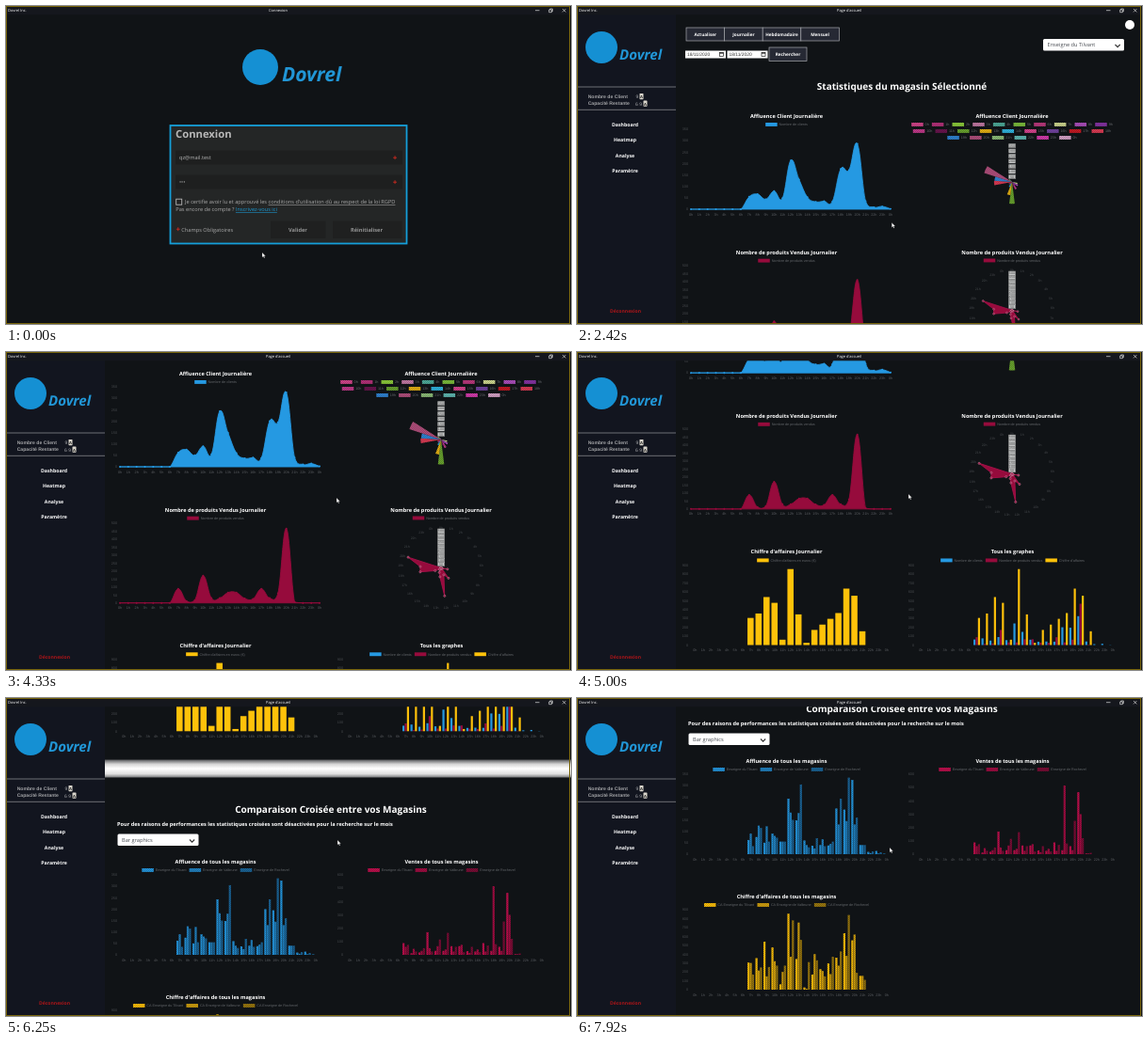
An HTML page that plays this animation: 600x338 px, repeating every 8000 ms.

```html
<!DOCTYPE html>
<html lang="fr">
<head>
<meta charset="utf-8">
<title>Tableau de bord</title>
<style>
html, body { margin: 0; width: 100%; height: 100%; overflow: hidden; background: #101316; }
svg { display: block; width: 100vw; height: 100vh; }
text { font-family: "Open Sans", sans-serif; text-rendering: geometricPrecision; white-space: pre; }
.axis { font-family: "Liberation Sans", Arial, sans-serif; }
.b { font-weight: 700; }
.m { text-anchor: middle; }
.e { text-anchor: end; }
</style>
</head>
<body>
<svg id="stage" viewBox="0 0 600 338" preserveAspectRatio="none"></svg>
<script>
const LOOP = 8000, BRAND = 'Dovrel';
const BLUE = '#2599e2', CRIMSON = '#960b3c', YELLOW = '#ffc20a';
const SHOPS = ['Enseigne du Tilvant', 'Enseigne de Valbrune', 'Enseigne de Rochevel'];

// Hourly values, opening at 7h, padded to 25 labels (0h ... 23h, 0h)
const day = (...v) => [...Array(7).fill(0), ...v, ...Array(18 - v.length).fill(0)];
const clients = [
  day(62, 75, 50, 90, 55, 243, 148, 60, 37, 40, 38, 200, 195, 325, 40, 10, 14, 2),
  day(90, 125, 122, 80, 55, 182, 180, 40, 25, 65, 45, 130, 145, 130, 40, 5, 3),
  day(35, 115, 55, 72, 55, 150, 305, 30, 70, 35, 55, 243, 335, 160, 40, 12, 8)];
const sold = [
  day(88, 12, 18, 170, 30, 30, 65, 65, 28, 25, 88, 30, 60, 465, 5),
  day(60, 45, 30, 50, 65, 40, 25, 75, 15, 40, 25, 515, 30, 300, 5),
  day(75, 25, 50, 25, 115, 165, 60, 20, 60, 20, 70, 80, 250, 120, 10)];
const sales = [
  day(305, 355, 540, 475, 60, 855, 345, 25, 170, 230, 295, 360, 635, 555, 155),
  day(300, 215, 150, 320, 200, 370, 755, 10, 400, 210, 175, 270, 380, 620, 155),
  day(170, 250, 255, 270, 270, 780, 560, 310, 330, 150, 370, 430, 840, 190, 110)];
const radarPeaks = { 11: 100, 12: 380, 13: 120, 18: 285, 19: 280 };
const radarValues = sold[0].map((v, h) => radarPeaks[h] ?? v);

const rect = (x, y, w, h, fill, extra = '') =>
  `<rect x="${x}" y="${y}" width="${w}" height="${h}" fill="${fill}" ${extra}/>`;
const text = (x, y, s, size, fill = '#fff', cls = '', extra = '') =>
  `<text x="${x}" y="${y}" font-size="${size}" fill="${fill}" class="${cls}" ${extra}>${s}</text>`;
const path = (d, fill, extra = '') => `<path d="${d}" fill="${fill}" ${extra}/>`;
const circle = (x, y, r, fill, extra = '') => `<circle cx="${x}" cy="${y}" r="${r}" fill="${fill}" ${extra}/>`;
const line = (d, color, width = 1) => path(d, 'none', `stroke="${color}" stroke-width="${width}"`);
const hour = i => `${i % 24}h`;

const ruler = document.createElement('canvas').getContext('2d');
ruler.font = '37.5px "Liberation Sans", Arial, sans-serif';
const labelWidth = s => ruler.measureText(s).width / 10;

// items: [label, colour, patterned]
function legend(cx, y, items) {
  const pitch = items.map(([s]) => 17.5 + labelWidth(s));
  let x = cx - (pitch.reduce((a, b) => a + b) - 3.1) / 2;
  return items.map(([s, color, dotted], i) => {
    const box = fill => rect(x, y - 2, 12.5, 3.9, fill);
    const out = box(color) + (dotted ? box('url(#dots)') : '') + text(x + 14.4, y + 1.3, s, 3.75, '#63666a', 'axis');
    x += pitch[i];
    return out;
  }).join('');
}

const grow = (x, y, body, axes = 'y') => `<g class="grow" data-x="${x}" data-y="${y}" data-axes="${axes}">${body}</g>`;

// Left edge x and vertical offset y place a 212 x 85 plot
const plotBase = 216, plotWidth = 212;
function frame(x, y, title, max, step, offset) {
  let out = text(x + 101.5, y + 119, title, 5.6, '#fff', 'b m');
  for (let v = 0; v <= max; v += step)
    out += text(x - 3, y + plotBase + 1.3 - v / max * 85, v, 3.75, '#484b4f', 'axis e');
  const gap = offset ? plotWidth / 25 : plotWidth / 24;
  for (let i = 0; i < 25; i++)
    out += text(x + gap * (i + (offset ? .5 : 0)), y + 222.5, hour(i), 3.75, '#5a5d61', 'axis m');
  return out;
}

function areaChart(x, y, title, label, color, values, max, step) {
  const floor = y + plotBase;
  const pts = values.map((v, i) => [x + i * plotWidth / 24, floor - v / max * 85]);
  let d = `M${pts[0]}`;
  for (let i = 1; i < 25; i++) {
    const [p, a, b, n] = [pts[Math.max(i - 2, 0)], pts[i - 1], pts[i], pts[Math.min(i + 1, 24)]];
    const handle = (q, s, t, k) => [q[0] + (t[0] - s[0]) * k, Math.min(floor, q[1] + (t[1] - s[1]) * k)];
    d += `C${handle(a, p, b, .2)} ${handle(b, a, n, -.2)} ${b}`;
  }
  const dots = pts.map(([px, py]) => circle(px, py, 1, color)).join('');
  return frame(x, y, title, max, step) + legend(x + 101.5, y + 126, [[label, color]]) +
    grow(0, floor, path(`${d}V${floor}H${x}Z`, color, `stroke="${color}" stroke-width=".9"`) + dots);
}

// series: [label, colour, values, patterned]
function barChart(x, y, title, series, max, step) {
  const slot = plotWidth / 25, width = slot * .84 / series.length;
  let bars = '';
  series.forEach(([, color, values, dotted], k) => values.forEach((v, i) => {
    if (!v) return;
    const h = v / max * 85;
    const bar = fill => rect(x + slot * (i + .08) + k * width, y + plotBase - h, width * .92, h, fill);
    bars += bar(color) + (dotted ? bar('url(#dots)') : '');
  }));
  return frame(x, y, title, max, step, true) +
    legend(x + 101.5, y + 126, series.map(([s, c, , dotted]) => [s, c, dotted])) +
    grow(0, y + plotBase, bars);
}

const polar = (cx, cy, r, index) => {
  const a = index / 25 * 2 * Math.PI;
  return [cx + r * Math.sin(a), cy - r * Math.cos(a)];
};
function radialTicks(cx, cy, radius, max) {
  let out = '';
  for (let v = 50; v <= max; v += 50) {
    const y = cy - v / max * radius;
    out += rect(cx - 3.8, y - 2.3, 7.6, 4.5, '#c3c5c5', 'stroke="#222" stroke-width=".25"') + text(cx, y + 1.3, v, 3.75, '#555', 'axis m');
  }
  return out;
}

const accents = ['#d6468d', '#b8327c', '#8fd03c', '#c77ca8', '#4fae9c', '#7fc13d', '#c03a80', '#d3dc92', '#b050c0', '#8a35a8',
  '#c43a8c', '#6b1550', '#6aa52f', '#eab414', '#31b9e4', '#db4591', '#7444a4', '#c81a24', '#df3c55',
  '#3187d8', '#b5517f', '#8fc07a', '#62bdb6', '#d93db0', '#dba6cc'];

function polarChart(cx, cy, title) {
  const wedges = clients[0].map((v, i) => {
    const r = v / 350 * 38;
    const d = `M${cx},${cy}L${polar(cx, cy, r, i)}A${r},${r} 0 0 1 ${polar(cx, cy, r, i + 1)}Z`;
    return path(d, accents[i]) + path(d, 'url(#dots)');
  }).join('');
  const items = accents.map((c, i) => [hour(i), c, true]);
  return text(cx, 119, title, 5.6, '#fff', 'b m') +
    [[0, 10], [10, 19], [19, 25]].map(([a, b], row) => legend(cx, 126 + row * 7, items.slice(a, b))).join('') +
    grow(cx, cy, wedges, 'xy') + radialTicks(cx, cy, 38.5, 350);
}

function radarChart(cx, cy, title) {
  const pts = radarValues.map((v, i) => polar(cx, cy, v / 500 * 39.5, i));
  const ring = pts.map((_, i) => {
    const [x, y] = polar(cx, cy, 43, i);
    return text(x, y + 1.3, hour(i), 3.5, '#45484c', 'axis m');
  }).join('');
  const shape = path(`M${pts.join('L')}Z`, CRIMSON, 'stroke="#a8104a" stroke-width=".9"') +
    pts.map(([x, y]) => circle(x, y, 1.1, CRIMSON, 'stroke="#c98aa3" stroke-width=".5"')).join('');
  return text(cx, 263.5, title, 5.6, '#fff', 'b m') +
    legend(cx, 270.5, [['Nombre de produits vendus', CRIMSON]]) + ring +
    radialTicks(cx, cy, 39.5, 500) + grow(cx, cy, shape, 'xy');
}

const button = (x, y, w, h, label) =>
  rect(x, y, w, h, '#262934', 'stroke="#a5a7ac" stroke-width=".7"') + text(x + w / 2, y + h / 2 + 1.7, label, 4.7, '#fff', 'b m');
const select = (x, y, label) => rect(x, y, 86, 12.5, '#fff', 'rx="1.5"') + text(x + 4.5, y + 8.3, label, 5.65, '#484c52') +
  line(`M${x + 76.5},${y + 6}l2.6,2.6 2.6,-2.6`, '#333', 1.1);
const dateField = (x, label) => rect(x, 47.5, 43, 8, '#fff') + text(x + 2, 53.3, label, 4.9, '#333', 'axis') +
  rect(x + 36.5, 49.4, 4, 4, 'none', 'stroke="#222" stroke-width=".7"') + rect(x + 36.5, 49.4, 4, 1.2, '#222');

function titleBar(title) {
  return rect(0, 0, 600, 9.3, '#15171d') + text(2, 6.1, `${BRAND} Inc.`, 4, '#fff') + text(289, 6.1, title, 4, '#fff', 'm') +
    line('M562,4.7h4.5M591,3l3.4,3.4M594.4,3l-3.4,3.4M576.7,4h2.7v2.7h-2.7zM577.7,4v-1h2.7v2.7h-1', '#ddd', .7);
}

const field = (y, label) => rect(180, y, 241, 15, '#1e1f1f') + text(184, y + 9.6, label, 5.65, '#b2b2b2') +
  text(413, y + 10.5, '+', 8, '#d02a20', 'b m');
const loginText = (x, y, s) => text(x, y, s, 5.65, '#a8a8a8');

const login = `<g id="login">${rect(0, 0, 600, 338, '#101316')}
  ${circle(270, 65, 19, '#1590d3')}
  ${text(293, 80, BRAND, 21, '#2196d6', 'b', 'font-style="italic"')}
  ${rect(174.5, 127, 251, 125.5, '#242626', 'stroke="#159fd9" stroke-width="1.8"')}
  ${text(180, 140, 'Connexion', 11.25, '#b8b8b8', 'b')}
  ${field(153.5, 'qz@mail.test')}${field(179.5, '•••')}
  <g id="unchecked">${rect(180.7, 205.2, 6, 6, '#222', 'stroke="#b5b5b5" stroke-width=".9"')}</g>
  <g id="checked">${rect(180.7, 205.2, 6, 6, '#d02f35', 'stroke="#e9b0b0" stroke-width=".9"')}${line('M181.8,208.2l1.5,1.6 2.7,-3.2', '#fff')}</g>
  ${loginText(190, 210.3, 'Je certifie avoir lu et approuvé les <tspan text-decoration="underline dotted">conditions d\'utilisation dû au respect de la loi RGPD</tspan>')}
  ${loginText(180.3, 218.4, 'Pas encore de compte ? <tspan fill="#1b9ad4" text-decoration="underline">Inscrivez-vous ici</tspan>')}
  ${text(182.7, 240.3, '+', 8, '#d02a20', 'b m')}${loginText(186.3, 239.6, 'Champs Obligatoires')}
  <g id="buttons">${rect(281, 228.5, 58.5, 18.5, '#1e1f1f')}${rect(347, 228.5, 73.5, 18.5, '#1e1f1f')}
    ${text(383, 239.7, 'Réinitialiser', 5.65, '#b8b8b8', 'b m')}
    <g id="submitLabel">${text(310, 239.7, 'Valider', 5.65, '#b8b8b8', 'b m')}</g></g>
  <g id="home">${rect(281, 228.5, 58.5, 18.5, '#201d1d')}
    ${line('M306,239.3l4,-3.7 4,3.7M307.2,238.5v4.2h1.8v-2.6h2v2.6h1.8v-4.2', '#d2d2d2', .9)}</g>
  ${titleBar('Connexion')}</g>`;

const badge = x => rect(x, 93, 4, 6.2, '#d9d5cc', 'rx=".6"') + text(x + 2, 98, 'A', 4.2, '#222', 'b m');
const sidebar = rect(0, 9, 105, 329, '#12151f') + circle(26, 44, 17, '#1590d3') +
  text(45, 57, BRAND, 15, '#2196d6', 'b', 'font-style="italic"') +
  line('M0,86H105M0,110.3H105', '#85878b', .8) +
  text(11.7, 97.8, 'Nombre de Client', 5.1, '#a4a5a8', 'axis b') + text(11.7, 105.3, 'Capacité Restante', 5.1, '#a4a5a8', 'axis b') +
  text(62.5, 98, '9', 5, '#a4a5a8', 'axis') + badge(66.5) +
  text(62, 105.5, '6 9', 5, '#a4a5a8', 'axis') + `<g transform="translate(0 7.5)">${badge(70.5)}</g>` +
  ['Dashboard', 'Heatmap', 'Analyse', 'Paramètre'].map((s, i) => text(51, 128 + i * 16.4, s, 5.2, '#fff', 'b m')).join('') +
  text(51.5, 326, 'Déconnexion', 5.1, '#a91519', 'b m');

const byShop = (data, colors, prefix = '') => SHOPS.map((s, i) => [prefix + s, colors[i], data[i], true]);
const L = 121, R = 361;
const content = ['Actualiser', 'Journalier', 'Hebdomadaire', 'Mensuel'].map((s, i) => button(116 + i * 40.6, 23, 40.6, 14, s)).join('') +
  dateField(115, '18/11/2020') + dateField(159.5, '18/11/2020') + button(204, 44, 40, 14.5, 'Rechercher') +
  select(495, 35, SHOPS[0]) + circle(587, 20, 5, '#fff') +
  text(345, 88.5, 'Statistiques du magasin Sélectionné', 10, '#fff', 'b m') +
  areaChart(L, 0, 'Affluence Client Journalière', 'Nombre de clients', BLUE, clients[0], 350, 50) +
  polarChart(462, 187, 'Affluence Client Journalière') +
  areaChart(L, 144.7, 'Nombre de produits Vendus Journalier', 'Nombre de produits vendus', CRIMSON, sold[0], 500, 50) +
  radarChart(462, 323.5, 'Nombre de produits Vendus Journalier') +
  barChart(L, 289.3, 'Chiffre d\'affaires Journalier', [['Chiffre d\'affaires en euros (€)', YELLOW, sales[0]]], 900, 100) +
  barChart(R, 289.3, 'Tous les graphes', [['Nombre de clients', BLUE, clients[0]],
    ['Nombre de produits vendus', CRIMSON, sold[0]], ['Chiffre d\'affaires', YELLOW, sales[0]]], 900, 100) +
  rect(105, 535.5, 495, 19, 'url(#band)') +
  text(345, 591.5, 'Comparaison Croisée entre vos Magasins', 10, '#fff', 'b m') +
  text(118, 606.3, 'Pour des raisons de performances les statistiques croisées sont désactivées pour la recherche sur le mois', 5.6, '#fff', 'b') +
  select(118.5, 614.5, 'Bar graphics') +
  barChart(L, 527, 'Affluence de tous les magasins', byShop(clients, [BLUE, '#2284c4', '#1b669a']), 350, 50) +
  barChart(R, 527, 'Ventes de tous les magasins', byShop(sold, ['#c2104e', '#a30d43', '#7c0d36']), 600, 100) +
  barChart(L, 671, 'Chiffre d\'affaires de tous les magasins', byShop(sales, [YELLOW, '#d3a20f', '#9b790f'], 'CA '), 900, 100);

const $ = id => document.getElementById(id);
$('stage').innerHTML = `<defs>
  <pattern id="dots" width="2" height="2" patternUnits="userSpaceOnUse"><path d="M0,0h1v1h-1zM1,1h1v1h-1z" fill="#000" opacity=".22"/></pattern>
  <linearGradient id="band" x2="0" y2="1"><stop stop-color="#55575a"/><stop offset=".25" stop-color="#d5d5d5"/>
    <stop offset=".5" stop-color="#fff"/><stop offset=".8" stop-color="#e0e0e0"/><stop offset="1" stop-color="#77797b"/></linearGradient>
  <clipPath id="view"><rect x="105" y="9" width="495" height="329"/></clipPath></defs>
  <g id="dashboard">${rect(0, 0, 600, 338, '#101316')}
    <g clip-path="url(#view)"><g id="content">${content}</g></g>${sidebar}${titleBar('Page d\'accueil')}</g>
  ${login}
  ${rect(.5, .5, 598, 337, 'none', 'stroke="#78650c"')}
  <g id="cursor">${path('M0,0V5.2L1.2,4.1 2.1,5.9 2.9,5.5 2.2,3.8H3.7Z', '#fff', 'stroke="#222" stroke-width=".25"')}</g>
  <g id="hand">${path('M-1.2,-3.2q.8,-.9 1.4,0v2.3l3,.7q.8,.3 .6,1.2l-.6,2.8h-4l-2,-3q.1,-1 1.6,0z', '#fff', 'stroke="#222" stroke-width=".3"')}</g>`;

// Keys: [time, value, ...], interpolated linearly
function track(keys, t) {
  const i = keys.findIndex(k => k[0] > t);
  if (i === 0) return keys[0].slice(1);
  if (i < 0) return keys.at(-1).slice(1);
  const [a, b] = [keys[i - 1], keys[i]], f = (t - a[0]) / (b[0] - a[0]);
  return a.slice(1).map((v, k) => v + (b[k + 1] - v) * f);
}
const scrollKeys = [[3450, 0], [4200, 94], [4400, 94], [5580, 290], [6230, 470], [6700, 470], [7650, 577]];
const cursorKeys = [[90, 272, 262], [780, 183, 208], [1080, 183, 208], [1580, 335, 237], [2300, 335, 237],
  [3100, 330, 192.5], [3400, 330, 192.5], [3900, 351, 155], [4400, 351, 155], [5000, 352, 151], [6800, 352, 151], [7600, 332, 159]];

const growing = [...document.querySelectorAll('.grow')];
const show = (id, on) => $(id).style.display = on ? '' : 'none';

function draw(now) {
  const t = now % LOOP;
  const onLogin = t < 1950, ticked = t >= 980, hovering = t >= 1430 && t < 2000;
  show('login', onLogin);
  show('dashboard', !onLogin);
  show('unchecked', !ticked);
  show('checked', ticked);
  $('buttons').style.filter = ticked ? 'none' : 'blur(.7px)';
  $('buttons').style.opacity = ticked ? 1 : .75;
  show('submitLabel', !hovering);
  show('home', hovering);

  const k = 1 - (1 - Math.min(1, Math.max(0, (t - 2050) / 900))) ** 4;
  for (const g of growing) {
    const { x, y, axes } = g.dataset;
    g.setAttribute('transform', `translate(${x} ${y}) scale(${axes === 'xy' ? k : 1} ${k}) translate(${-x} ${-y})`);
  }
  $('content').setAttribute('transform', `translate(0 ${-track(scrollKeys, t)[0]})`);

  const at = `translate(${track(cursorKeys, t).join(' ')})`;
  show('cursor', !hovering);
  show('hand', hovering);
  $('cursor').setAttribute('transform', at);
  $('hand').setAttribute('transform', at);
  requestAnimationFrame(loop);
}
const start = performance.now();
const loop = () => draw(performance.now() - start);
loop();
</script>
</body>
</html>
```
